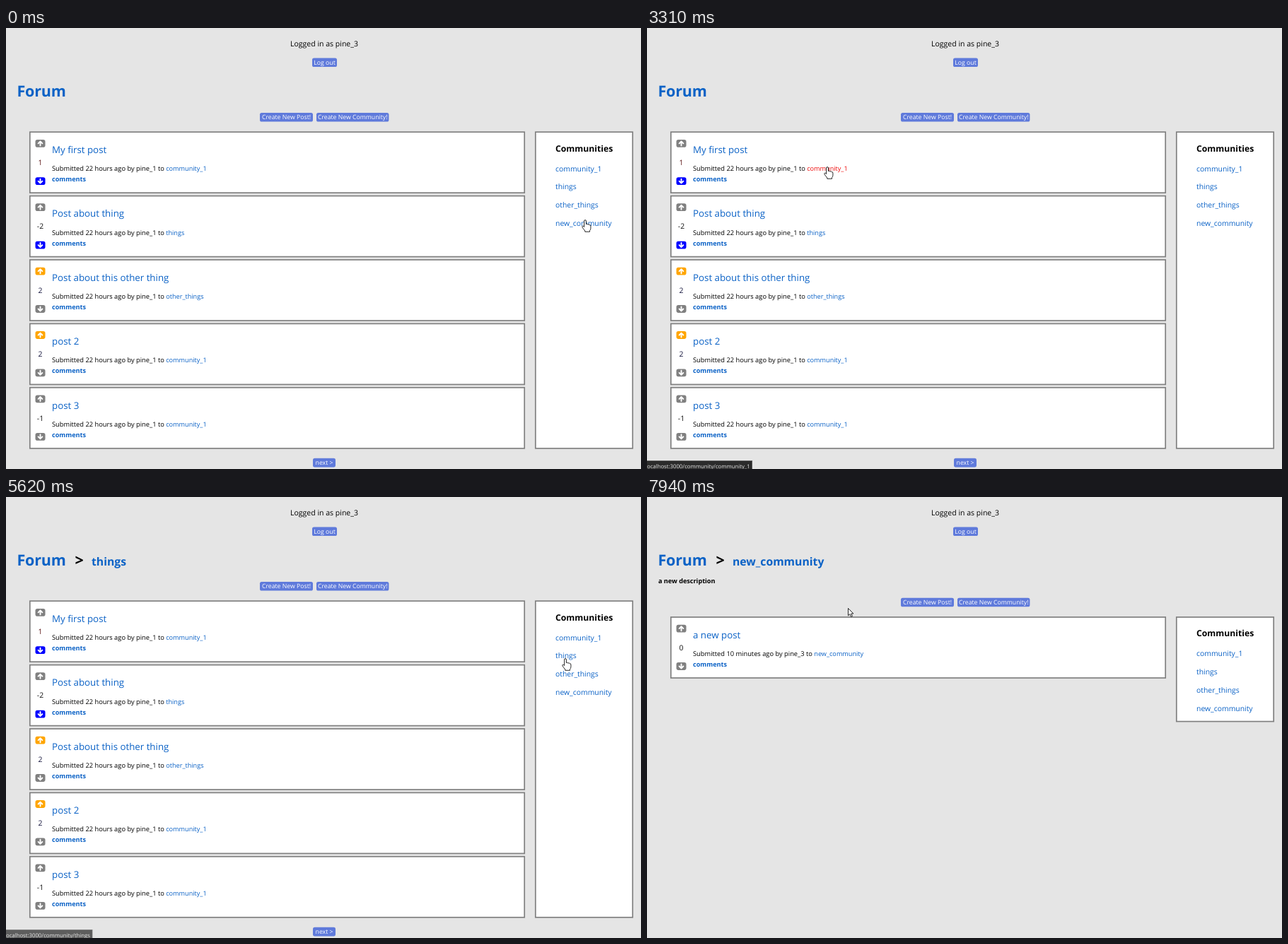
Animation of 898x624 px, one loop 8000 ms. Source, as an HTML page:

```html
<!DOCTYPE html>
<html lang="en">
<head>
<meta charset="utf-8">
<title>Forum</title>
<style>
  html, body { margin: 0; width: 100%; height: 100%; overflow: hidden; background: #e5e5e5; }
  svg { display: block; font-family: "Open Sans", "Noto Sans", sans-serif; text-rendering: geometricPrecision; }
  .link { fill: #0b62c6; }
  .bold { font-weight: 700; }
  .mid { text-anchor: middle; }
  .hot { fill: #ee0b0b; }
  .panel { fill: #fff; stroke: #808080; stroke-width: 1.7; }
  .button rect { fill: #5f7adb; }
  .button text { fill: #fff; font-size: 8.7px; text-anchor: middle; }
  .vote path { fill: none; stroke: #fff; stroke-width: 1.9; stroke-linecap: round; stroke-linejoin: round; }
  .pointer { fill: #fff; stroke: #111; stroke-width: .9; stroke-linejoin: round; }
</style>
</head>
<body>
<svg width="898" height="624" viewBox="0 0 898 624">
  <g id="page"></g>
  <g id="status">
    <rect x="-2" y="612.3" height="14" fill="#2b2b2b" stroke="#555" stroke-width=".6"/>
    <text x="0" y="622.8" font-size="7.75" fill="#e6e6e6"></text>
  </g>
  <circle id="click" r="9" fill="#ffdc00" fill-opacity=".72"/>
  <g id="cursor" class="pointer">
    <path id="hand" d="M-1.4 1Q-1.3-.3 0-.3T1.4 1V5.6Q2.8 4.7 3.9 6Q5.3 5.3 6.2 6.7Q7.8 6.3 7.9 8.2V11.4Q7.8 13.6 6.5 14.6V16.3H-.2V15Q-2.2 12.8-3.9 10.1Q-4.6 8.6-3.5 8.1Q-2.4 7.8-1.4 9.5Z"/>
    <path id="arrow" d="M0 0V10.3L2.4 8.1L4.1 12L5.9 11.2L4.2 7.5H7.4Z"/>
  </g>
</svg>
<script>
const LOOP = 8000;
const $ = id => document.getElementById(id);

const post = (title, to, score, vote = 0, by = '22 hours ago by pine_1') => ({ title, to, score, vote, by });
const first = post('My first post', 'community_1', 1, -1);
const thing = post('Post about thing', 'things', -2, -1);
const other = post('Post about this other thing', 'other_things', 2, 1);
const second = post('post 2', 'community_1', 2, 1);
const third = post('post 3', 'community_1', -1);

const lists = {
  home: [first, thing, other, second, third],
  community_1: [first, second, third, post('post 4', 'community_1', 0), post('post with link', 'community_1', 0)],
  things: [thing],
  other_things: [other],
  new_community: [post('a new post', 'new_community', 0, 0, '10 minutes ago by pine_3')]
};
const about = {
  community_1: 'description stuff',
  things: 'This is a community about things',
  other_things: 'This is a community about other things',
  new_community: 'a new description'
};
const communities = Object.keys(about);

// start, heading, list of posts; the description shows once both agree
const pages = [
  [0, 'home', 'home'], [600, 'community_1', 'home'], [730, 'community_1', 'community_1'],
  [2250, 'home', 'community_1'], [2380, 'home', 'home'], [3380, 'community_1', 'community_1'],
  [4500, 'home', 'community_1'], [4640, 'home', 'home'], [5560, 'things', 'home'],
  [5690, 'things', 'things'], [6560, 'other_things', 'other_things'], [7490, 'new_community', 'new_community']
];
// start, end, hovered part
const hovers = [
  [330, 600, 'community_1'], [1980, 2250, 'forum'], [3240, 3380, 'post'], [4230, 4500, 'forum'],
  [5230, 5560, 'things'], [6060, 6560, 'other_things'], [7280, 7490, 'new_community']
];
// start, start of fade, path
const statuses = [
  [330, 720, '/community/community_1'], [1980, 2400, ''], [3240, 3640, '/community/community_1'],
  [4230, 4520, ''], [5230, 5580, '/community/things'], [6060, 6640, '/community/other_things'],
  [7280, 7560, '/community/new_community']
];
const clicks = [[460, 590], [2150, 2250], [4400, 4490], [5420, 5540], [6420, 6550], [7390, 7480]];
const hands = [[0, 130], [330, 990], [1950, 2560], [3200, 3640], [4200, 4720], [5200, 5800], [6040, 6700], [7260, 7580]];
// time, x, y of the pointer tip
const route = [
  [0, 819, 272], [60, 819, 272], [420, 800, 200], [990, 800, 200], [1780, 97, 110], [1850, 96, 109],
  [2110, 43, 87], [2450, 43, 87], [3240, 255, 197], [3640, 255, 197], [4360, 51, 89], [4560, 52, 90],
  [5300, 791, 229], [5690, 791, 229], [6150, 799.5, 267], [6280, 800, 275], [6620, 800, 275],
  [7210, 805, 287], [7300, 807, 296], [7530, 807, 296], [7880, 284.5, 157.5], [LOOP, 284.5, 157.5]
];

const text = (x, y, size, cls, body, extra = '') =>
  `<text x="${x}" y="${y}" font-size="${size}" class="${cls}" ${extra}>${body}</text>`;
const panel = (x, y, w, h) => `<rect class="panel" x="${x}" y="${y}" width="${w}" height="${h}"/>`;
const button = (x, y, w, label) =>
  `<g class="button"><rect x="${x}" y="${y}" width="${w}" height="12.6" rx="2.6"/>` +
  `<text x="${x + w / 2}" y="${y + 9.5}">${label}</text></g>`;
const vote = (y, color, turn) =>
  `<g class="vote" transform="translate(48.5 ${y}) rotate(${turn})">` +
  `<rect x="-7" y="-5.4" width="14" height="10.8" rx="2.8" fill="${color}"/>` +
  `<path d="M0 3.1V-2.9M-2.9 0L0-2.9L2.9 0"/></g>`;

function card(p, y, hot) {
  const ink = { 1: '#5c1414', 2: '#14143c' }[p.score] || '#111';
  return panel(33.8, y, 699.4, 86) +
    vote(y + 16.1, p.vote > 0 ? '#ffa500' : '#808080', 0) +
    text(48.5, y + 46.8, 10.4, 'mid', p.score, `fill="${ink}"`) +
    vote(y + 69.5, p.vote < 0 ? '#00f' : '#808080', 180) +
    text(65, y + 29.7, 13.3, 'link', p.title) +
    text(65, y + 54.9, 9.3, '', `Submitted ${p.by} to <tspan class="link ${hot ? 'hot' : ''}" font-size="9.15">${p.to}</tspan>`) +
    text(65, y + 69.9, 9.1, 'link bold', 'comments');
}

function drawPage(head, list, hover) {
  const hot = name => hover === name ? ' hot' : '';
  const posts = lists[list];
  const described = head !== 'home' && head === list;
  const dy = described ? 22.8 : 0;
  const top = 147.2 + dy;
  const height = Math.max(147.6, posts.length * 90.4 - 4.4);
  let out = text(450, 26.4, 10.5, 'mid', 'Logged in as pine_3') +
    button(433, 42.4, 35, 'Log out') +
    text(15.5, 97, 21.5, 'link bold' + hot('forum'), 'Forum', 'letter-spacing="-.2"');
  if (head !== 'home') {
    out += text(97.5, 97, 21.5, 'bold', '&gt;') + text(121, 97, 15.75, 'link bold', head);
  }
  if (described) out += text(16, 122.4, 9.1, 'bold', about[head]);
  out += button(359, 119.9 + dy, 75, 'Create New Post!') +
    button(439, 119.9 + dy, 102.4, 'Create New Community!');
  posts.forEach((p, i) => out += card(p, top + i * 90.4, i === 0 && hover === 'post'));
  out += panel(748.8, top, 137.4, height) + text(777, 174.6 + dy, 12.2, 'bold', 'Communities');
  communities.forEach((name, i) => out += text(777, 202.5 + dy + i * 25.8, 10.4, 'link' + hot(name), name));
  if (posts.length > 1) out += button(434, 608.8 + dy, 32, 'next &gt;');
  $('page').innerHTML = out;
}

const within = (spans, t) => spans.find(([a, b]) => t >= a && t < b);
const show = (node, on) => node.style.display = on ? '' : 'none';

function tip(t) {
  const i = route.findIndex(k => k[0] > t);
  const [t0, x0, y0] = route[i - 1], [t1, x1, y1] = route[i];
  const u = (t - t0) / (t1 - t0), e = u * u * (3 - 2 * u);
  return `translate(${x0 + (x1 - x0) * e} ${y0 + (y1 - y0) * e})`;
}

const FADE = 150;
const [bar, barText] = $('status').children;
let shownPage, shownPath;

function drawStatus(t) {
  const s = statuses.find(([a, b]) => t >= a && t < b + FADE);
  show($('status'), s);
  if (!s) return;
  $('status').style.opacity = Math.min(1, 1 - (t - s[1]) / FADE);
  if (shownPath === s[2]) return;
  shownPath = s[2];
  barText.textContent = 'ocalhost:3000' + shownPath;
  bar.setAttribute('width', barText.getComputedTextLength() + 5);
}

function frame() {
  const t = performance.now() % LOOP;
  const [, head, list] = pages.filter(p => p[0] <= t).pop();
  const hover = (within(hovers, t) || [])[2];
  const key = [head, list, hover].join();
  if (key !== shownPage) {
    shownPage = key;
    drawPage(head, list, hover);
  }
  drawStatus(t);
  const place = tip(t);
  $('cursor').setAttribute('transform', place);
  $('click').setAttribute('transform', place);
  show($('click'), within(clicks, t));
  const hand = within(hands, t);
  show($('hand'), hand);
  show($('arrow'), !hand);
  requestAnimationFrame(frame);
}
frame();
</script>
</body>
</html>
```
